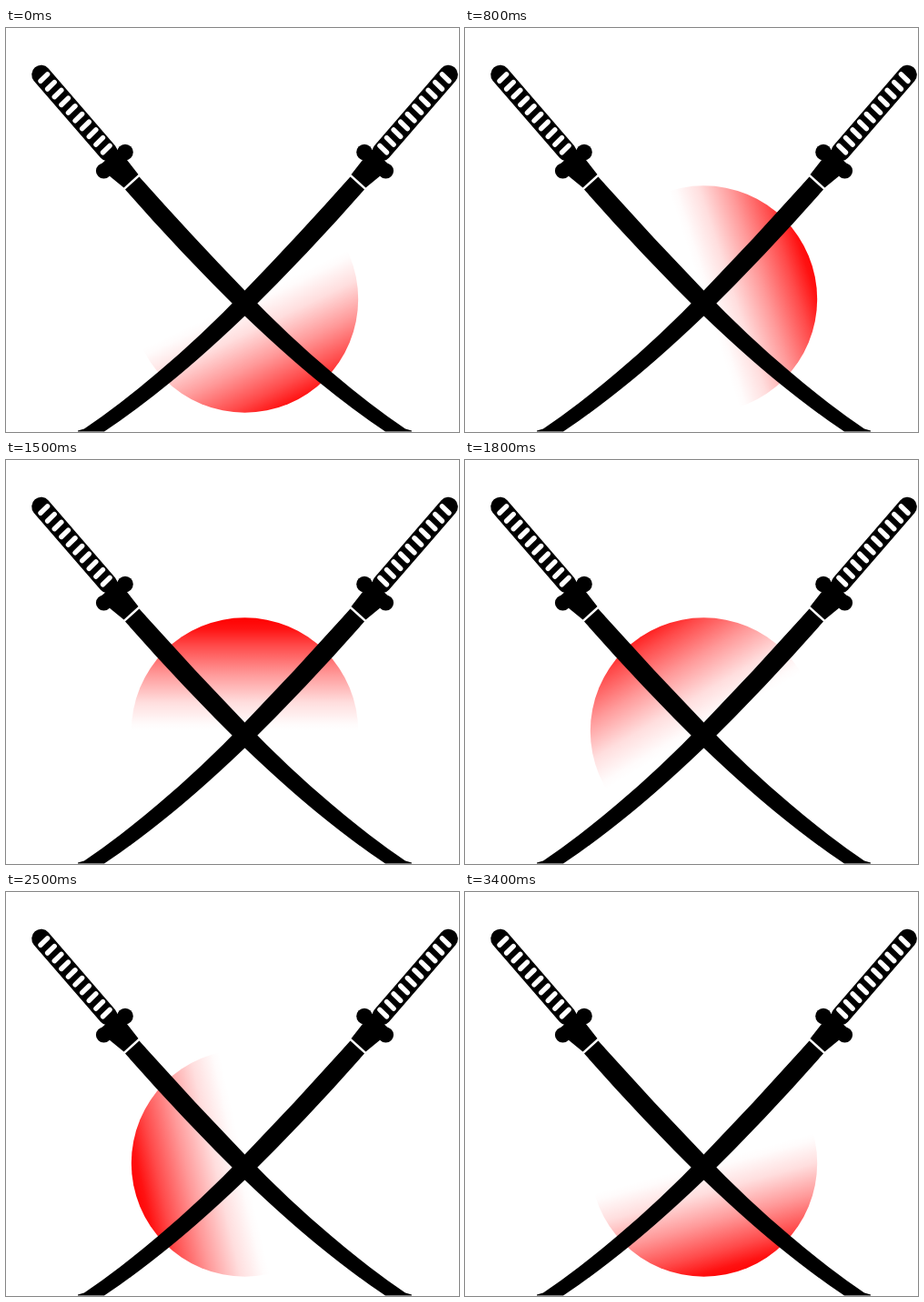
An HTML page for the animation above (3500 ms loop, 498x444 px).

```html
<!DOCTYPE html>
<html lang="en">
<head>
<meta charset="utf-8">
<title>Crossed swords</title>
<style>
html, body { margin: 0; width: 100%; height: 100%; overflow: hidden; background: #fff; }
svg { display: block; }
</style>
</head>
<body>
<svg width="498" height="444" viewBox="0 0 498 444">
  <defs>
    <linearGradient id="glow" gradientUnits="userSpaceOnUse" x1="262.5" y1="298">
      <stop offset="0" stop-color="#f00" stop-opacity="0"/>
      <stop offset=".06" stop-color="#f00" stop-opacity=".015"/>
      <stop offset=".25" stop-color="#f00" stop-opacity=".13"/>
      <stop offset=".5" stop-color="#f00" stop-opacity=".4"/>
      <stop offset=".75" stop-color="#f00" stop-opacity=".71"/>
      <stop offset=".9" stop-color="#f00" stop-opacity=".93"/>
      <stop offset="1" stop-color="#f00"/>
    </linearGradient>
    <g id="sword" stroke-linecap="round">
      <!-- blade -->
      <path d="M146.5 163.5Q203 227 262.5 288.5Q311 339 357 377.5Q401 415 439 440.5L446 442.5V443.5H417Q383 421 342 387.5Q306 358 262.5 316.5Q191 246 131 177.5Z"/>
      <!-- collar and guard -->
      <path d="M113 162L129.5 175.5L145.5 161L133 145L120 140Z"/>
      <path d="M107.5 157L131 136.5" stroke="#000" stroke-width="15"/>
      <circle cx="107.5" cy="157" r="8.6"/>
      <circle cx="131" cy="136.5" r="8.8"/>
      <!-- grip -->
      <path d="M38.7 51.3L112 136" stroke="#000" stroke-width="21"/>
      <g id="slits" stroke="#fff" stroke-width="5.4"></g>
    </g>
  </defs>
  <circle cx="262.5" cy="298" r="124.7" fill="url(#glow)"/>
  <use href="#sword"/>
  <use href="#sword" transform="matrix(-1 0 0 1 525 0)"/>
</svg>
<script>
const FRAMES = 35, STEP = 100, START = 64.3, CX = 262.5, CY = 298, R = 125;
const glow = document.getElementById('glow');

let slits = '';
for (let i = 0; i < 10; i++) {
  const x = 41.8 + i * 7.61, y = 54.6 + i * 8.72;
  slits += `<path d="M${x - 3.8} ${y + 3.7}L${x + 3.8} ${y - 3.7}"/>`;
}
document.getElementById('slits').innerHTML = slits;

function draw(now) {
  const frame = Math.floor(now / STEP) % FRAMES;
  const angle = (START - frame * 360 / FRAMES) * Math.PI / 180;
  const dx = Math.cos(angle), dy = Math.sin(angle);
  // The ramp ends on the square around the disc.
  const reach = R / Math.max(Math.abs(dx), Math.abs(dy));
  glow.setAttribute('x2', CX + dx * reach);
  glow.setAttribute('y2', CY + dy * reach);
  requestAnimationFrame(() => draw(performance.now() - begin));
}
const begin = performance.now();
draw(0);
</script>
</body>
</html>
```
